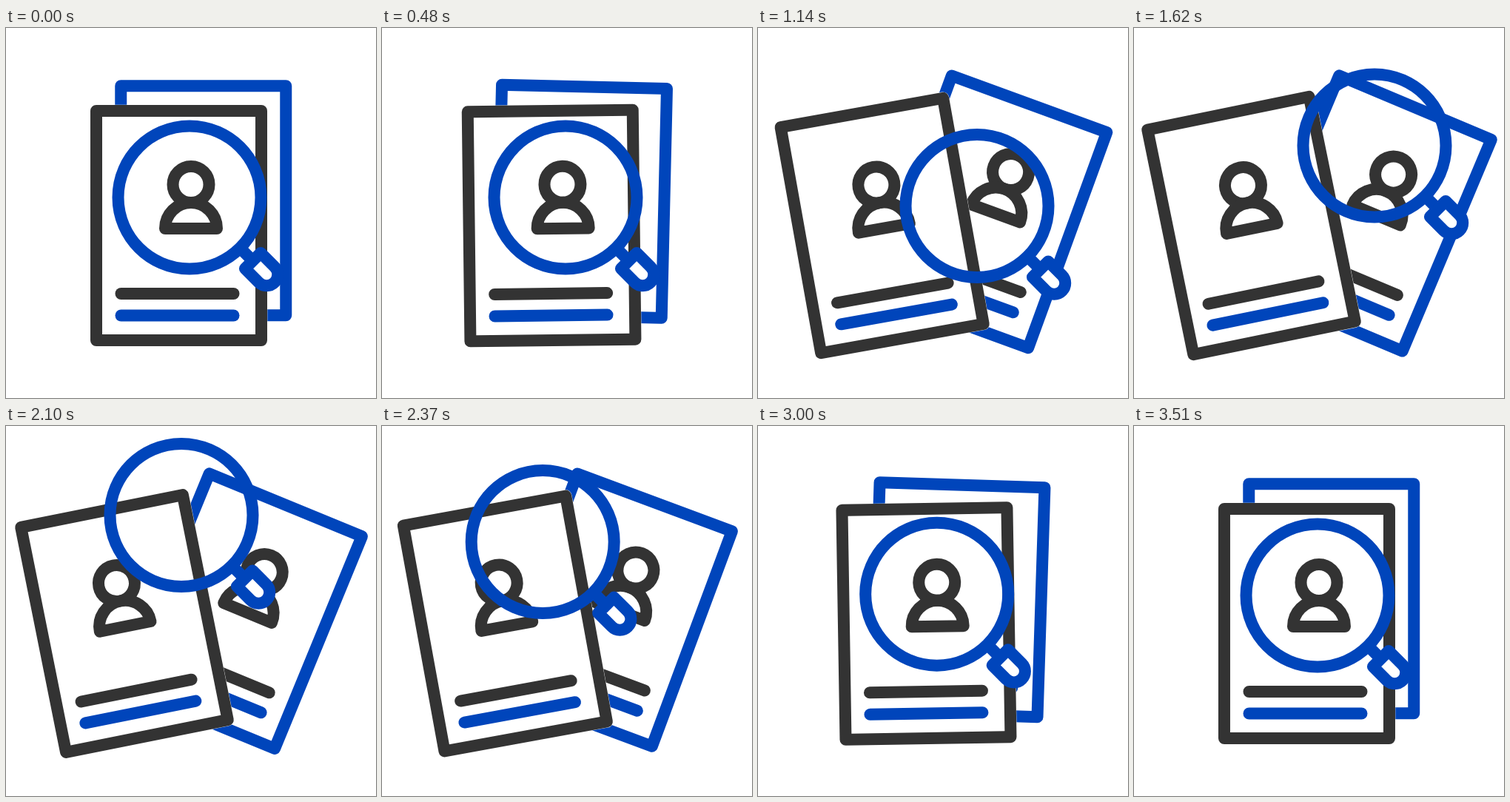
Recreate the animation shown at these times as an HTML page with a canvas. Size 500 by 500 pixels, loop 3600 ms.

```html
<!DOCTYPE html>
<html lang="en">
<head>
<meta charset="utf-8">
<title>Profile search</title>
<style>
  html, body { margin: 0; width: 100%; height: 100%; overflow: hidden; background: #fff; }
  canvas { display: block; width: 500px; height: 500px; }
</style>
</head>
<body>
<canvas id="stage"></canvas>
<script>
const BLUE = '#0045bb', DARK = '#333333', LOOP = 3600, STEP = 30, SWING = 1770;
const canvas = document.getElementById('stage');
const ctx = canvas.getContext('2d');
const ratio = window.devicePixelRatio || 1;
canvas.width = canvas.height = 500 * ratio;

const FRONT = { x: 233.5, y: 267, dx: -75.3, dy: 0, turn: -11.6, color: DARK,
  lineX: [-78, 74], lineY: [92, 121.5] };
const BACK = { x: 266.75, y: 233.25, dx: 53.4, dy: 17.3, turn: 22.9, color: BLUE,
  lineX: [-76, 76], lineY: [87.9, 117] };

// Lens waypoints: time, position, velocity in px/ms
const LENS = [
  { t: 540, x: 248, y: 229, vx: 0, vy: 0 },
  { t: 1140, x: 296, y: 240.5, vx: 0.13, vy: -0.06 },
  { t: 1620, x: 325, y: 159, vx: -0.07, vy: -0.16 },
  { t: 2100, x: 237, y: 120.5, vx: -0.13, vy: 0.04 },
  { t: 2640, x: 219, y: 203.5, vx: 0.03, vy: 0.12 },
  { t: 3180, x: 248, y: 229, vx: 0, vy: 0 }
];

// Cubic bezier easing (0.8, 0, 0.2, 1)
function ease(x) {
  if (x <= 0) return 0;
  if (x >= 1) return 1;
  let lo = 0, hi = 1;
  for (let i = 0; i < 30; i++) {
    const s = (lo + hi) / 2;
    if (2.4 * s - 4.2 * s * s + 2.8 * s * s * s < x) lo = s; else hi = s;
  }
  return lo * lo * (3 - 2 * lo);
}

function hermite(a, b, va, vb, span, s) {
  const s2 = s * s, s3 = s2 * s;
  return a * (2 * s3 - 3 * s2 + 1) + b * (3 * s2 - 2 * s3) +
    span * (va * (s3 - 2 * s2 + s) + vb * (s3 - s2));
}

function lensAt(time) {
  const t = Math.min(Math.max(time, LENS[0].t), LENS[LENS.length - 1].t);
  const i = Math.max(1, LENS.findIndex(k => k.t >= t));
  const a = LENS[i - 1], b = LENS[i], span = b.t - a.t, s = (t - a.t) / span;
  return [hermite(a.x, b.x, a.vx, b.vx, span, s), hermite(a.y, b.y, a.vy, b.vy, span, s)];
}

function stroke(color, width = 16) {
  ctx.strokeStyle = color;
  ctx.lineWidth = width;
  ctx.stroke();
}

function line(x1, y1, x2, y2, color) {
  ctx.beginPath();
  ctx.moveTo(x1, y1);
  ctx.lineTo(x2, y2);
  stroke(color);
}

function person(x, y) {
  ctx.beginPath();
  ctx.arc(x, y, 24.5, 0, Math.PI * 2);
  stroke(DARK);
  ctx.beginPath();
  ctx.arc(x, y + 59.5, 35, Math.PI, 0);
  ctx.closePath();
  stroke(DARK);
}

function card(c, p, headX, headY) {
  ctx.save();
  ctx.translate(c.x + c.dx * p, c.y + c.dy * p);
  ctx.rotate(c.turn * p * Math.PI / 180);
  ctx.beginPath();
  ctx.rect(-111.5, -155, 223, 310);
  ctx.fillStyle = '#fff';
  ctx.fill();
  stroke('#fff', 16.6);
  stroke(c.color);
  person(headX, headY);
  c.lineY.forEach((y, i) => line(c.lineX[0], y, c.lineX[1], y, i ? BLUE : DARK));
  ctx.restore();
}

function magnifier(x, y) {
  ctx.save();
  ctx.translate(x, y);
  ctx.rotate(Math.PI / 4);
  ctx.beginPath();
  ctx.arc(0, 0, 96.5, 0, Math.PI * 2);
  stroke(BLUE);
  line(97, 0, 121, 0, BLUE);
  ctx.beginPath();
  ctx.moveTo(121, -15);
  ctx.arc(147.4, 0, 15, -Math.PI / 2, Math.PI / 2);
  ctx.lineTo(121, 15);
  ctx.closePath();
  ctx.fillStyle = '#fff';
  ctx.fill();
  stroke(BLUE);
  ctx.restore();
}

function draw(time) {
  const p = time < SWING ? ease(time / SWING) : 1 - ease((time - SWING) / SWING);
  ctx.setTransform(ratio, 0, 0, ratio, 0, 0);
  ctx.fillStyle = '#fff';
  ctx.fillRect(0, 0, 500, 500);
  ctx.lineCap = ctx.lineJoin = 'round';
  card(BACK, p, 8, -60.2);
  card(FRONT, p, 16.5 * (1 - p), -55.5);
  magnifier(...lensAt(time));
}

const start = performance.now();
function tick() {
  const t = (performance.now() - start) % LOOP;
  draw(Math.min(Math.floor(t / STEP) * STEP, 3510));
  requestAnimationFrame(tick);
}
tick();
</script>
</body>
</html>
```
